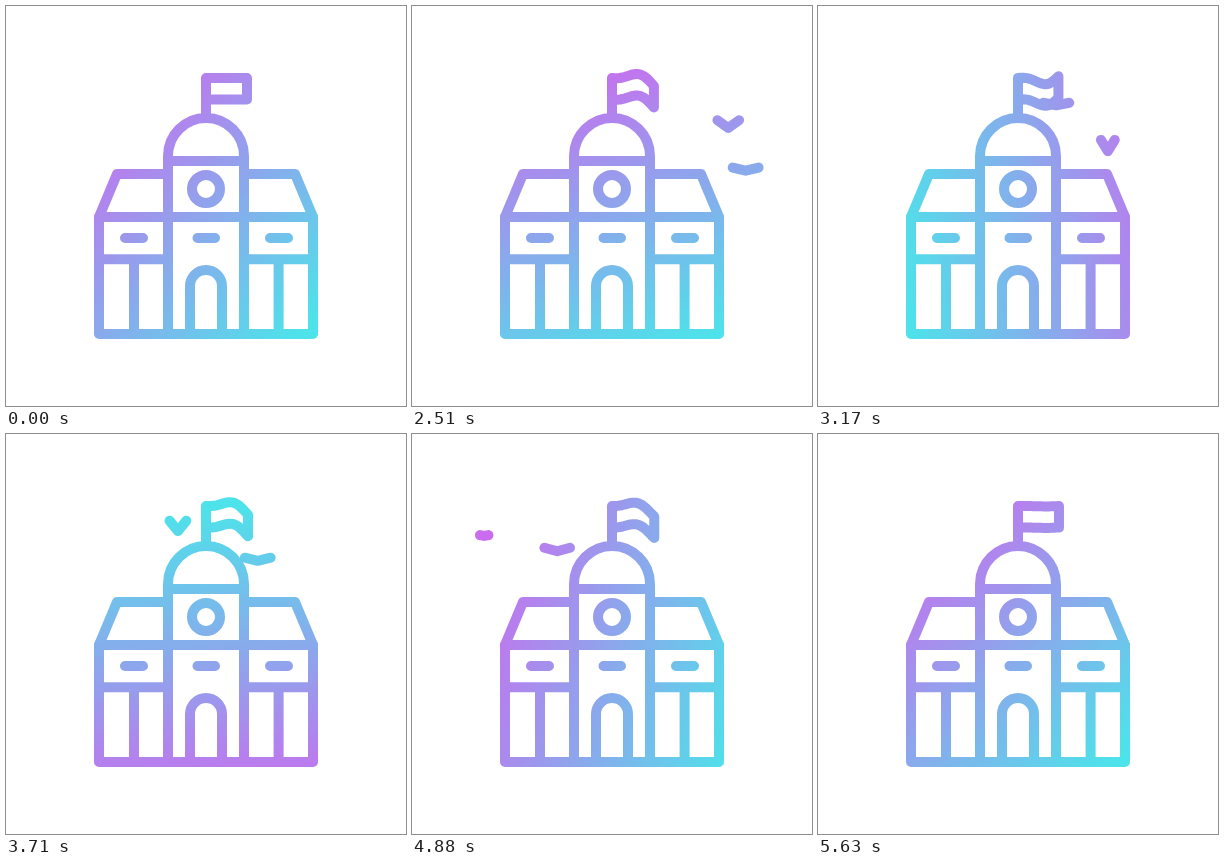
An HTML page for the animation above (5660 ms loop, 400 by 400 pixels).

```html
<!DOCTYPE html>
<html lang="en">
<head>
<meta charset="utf-8">
<title>School</title>
<style>
html, body { margin: 0; width: 100%; height: 100%; overflow: hidden; background: #fff; }
svg { display: block; width: 100vw; height: 100vh; }
</style>
</head>
<body>
<svg viewBox="0 0 400 400">
  <defs>
    <linearGradient id="tint" gradientUnits="userSpaceOnUse">
      <stop offset="0" stop-color="#c96dee"/>
      <stop offset="1" stop-color="#4ee2ea"/>
    </linearGradient>
  </defs>
  <g fill="none" stroke="url(#tint)" stroke-width="10" stroke-linecap="round" stroke-linejoin="round">
    <path d="M93 211H307V328H93Z M93 253.2H162 M238 253.2H307 M128 254V328 M272.600 254V328"/>
    <path d="M93 211L111 168H162 M238 168H289L307 211"/>
    <path d="M162 328V150a38 38 0 0 1 76 0V328 M162 155H238"/>
    <path d="M184 328V280a16 16 0 0 1 32 0V328"/>
    <path d="M119 232H137 M191.500 232H209 M264 232H282"/>
    <circle cx="200" cy="183" r="14"/>
    <path id="flag"/>
    <path id="birdA"/>
    <path id="birdB"/>
  </g>
</svg>
<script>
const LOOP = 5660, START = 2000, FIRST = 2030;
const RAD = Math.PI / 180;
const el = id => document.getElementById(id);
const tint = el('tint'), flag = el('flag');
const clamp = v => Math.max(0, Math.min(1, v));
const smooth = v => { v = clamp(v); return v * v * (3 - 2 * v); };
const quad = (a, b, c, f) => a * (1 - f) ** 2 + 2 * b * f * (1 - f) + c * f * f;

// from, peak, to: arc of the flight; lead and skew: uneven speed;
// flat: a moment with level wings; beat: flap period
const birds = [
  { node: el('birdA'), end: 4930, from: [368, 139], peak: 70, to: [70, 102],
    lead: 0.09, skew: 2, flat: 3160, beat: 870 },
  { node: el('birdB'), end: 5630, from: [368, 187], peak: 69, to: [58, 141],
    lead: -0.1, skew: 1.3, flat: 2600, beat: 1200 }
];

// One full turn of the gradient, fastest just before the middle
function drawTint(t) {
  const p = clamp((t - START) / (LOOP - START));
  const turn = 360 * smooth(p + 0.11 * Math.sin(Math.PI * p) ** 2) * RAD;
  const angle = turn + 45 * RAD, mid = 8 + 18 * Math.cos(turn);
  const put = (n, d) => {
    tint.setAttribute('x' + n, 200 + d * Math.cos(angle));
    tint.setAttribute('y' + n, 200 + d * Math.sin(angle));
  };
  put(1, mid - 165);
  put(2, mid + 130);
}

// A wave running from the pole to the free edge
function drawFlag(t) {
  const amp = t < FIRST ? 0 : clamp((t - START) / 90) * smooth((LOOP - t) / 480 + 0.1);
  const phase = ((t - START) / 1220 * 360 - 8) * RAD;
  const width = 41 + 1.5 * amp * Math.sin(phase);
  const edge = y => Array.from({ length: 17 }, (_, i) => {
    const u = i / 16;
    const wave = 2 * u * u + 10 * u ** 1.3 * Math.sin(phase + 260 * RAD * (1 - u));
    return (200 + width * u).toFixed(2) + ' ' + (y + amp * wave).toFixed(2);
  });
  flag.setAttribute('d', 'M200 112V72L' + edge(72).concat(edge(93.5).reverse()).join('L'));
}

function drawBird(b, t) {
  const on = t >= FIRST && t < b.end;
  b.node.style.display = on ? '' : 'none';
  if (!on) return;
  const s = (t - FIRST) / (b.end - FIRST);
  const f = s + b.lead * Math.sin(Math.PI * s ** b.skew);
  const x = b.from[0] + (b.to[0] - b.from[0]) * f;
  const y = quad(b.from[1], b.peak, b.to[1], f);
  const lift = Math.sin(Math.PI * (t - b.flat) / b.beat) ** 2;
  const wing = 13.3 * Math.min(clamp((t - START) / 320), clamp((b.end - t) / 150));
  const a = (11 + 48 * lift) * RAD;
  const dx = wing * Math.cos(a), dy = wing * Math.sin(a) / 2;
  b.node.setAttribute('d', `M${x - dx} ${y - dy}L${x} ${y + dy}L${x + dx} ${y - dy}`);
}

function draw(t) {
  drawTint(t < FIRST ? START : t);
  drawFlag(t);
  birds.forEach(b => drawBird(b, t));
}

const begin = performance.now();
function tick() {
  draw((performance.now() - begin) % LOOP);
  requestAnimationFrame(tick);
}
draw(0);
requestAnimationFrame(tick);
</script>
</body>
</html>
```
